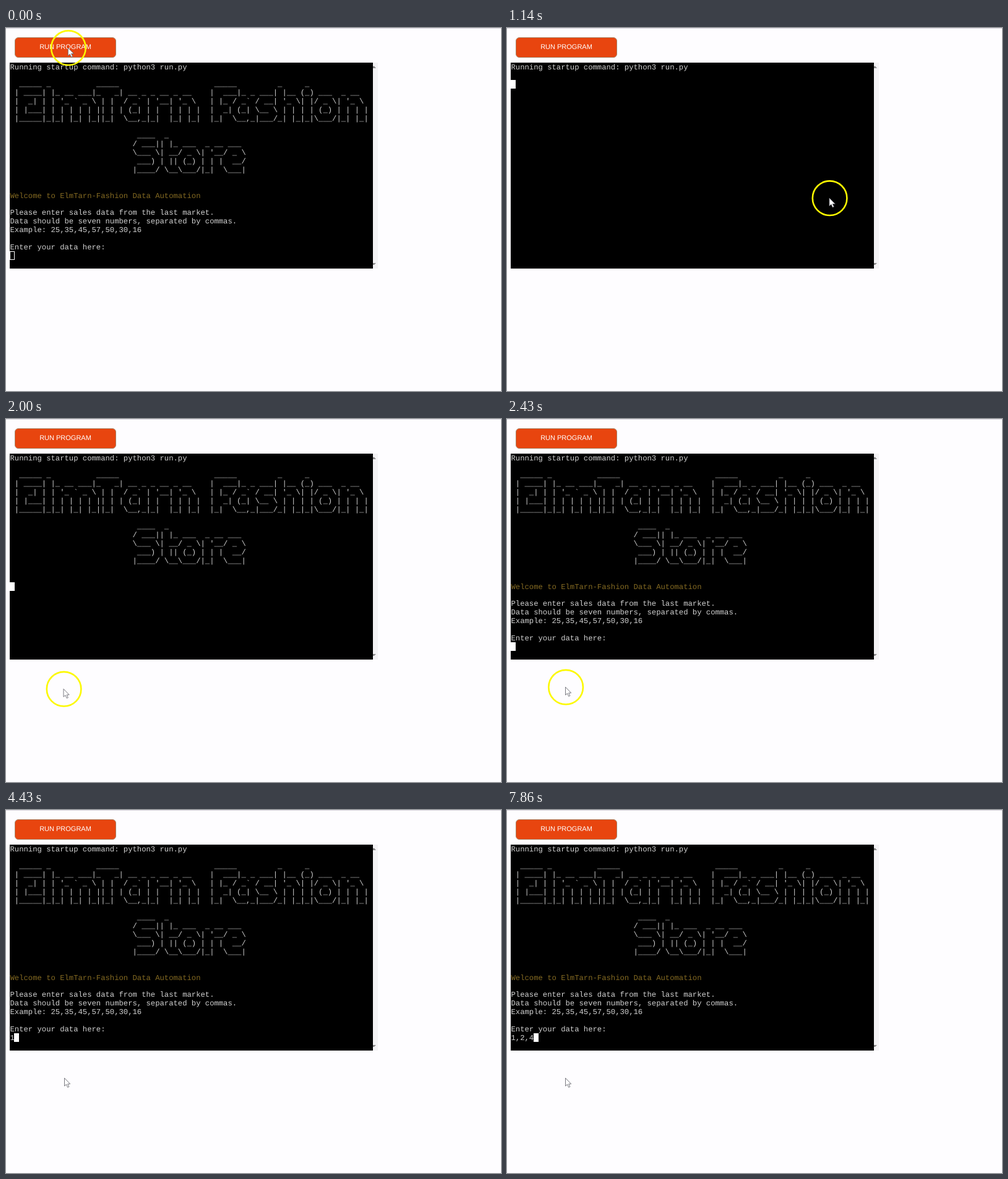
Animation, 800 px wide and 587 px high, one loop 8000 ms. Source, as an HTML page:

```html
<!DOCTYPE html>
<html lang="en">
<head>
<meta charset="utf-8">
<title>Terminal run</title>
<style>
  html, body { margin: 0; width: 100%; height: 100%; overflow: hidden; background: #fefdff; }
  #stage { position: absolute; left: 0; top: 0; width: 800px; height: 587px; overflow: hidden; }
  #stage > *, #term > * { position: absolute; margin: 0; box-sizing: border-box; }
  #topline { left: 0; top: 0; width: 800px; height: 1px; background: #d9d6de; }
  #run {
    left: 14px; top: 15px; width: 164px; height: 33px; border: 1px solid #a98468; border-radius: 6px;
    background: #e8450f; color: #fff; text-align: center;
    font: 11px/31px "Liberation Sans", Arial, sans-serif; text-rendering: geometricPrecision;
  }
  #term {
    left: 6px; top: 56px; width: 587px; height: 333px; background: #000; color: #d0d0d0;
    --row: 13.87px;
    font: 12.22px/var(--row) "Liberation Mono", "Courier New", monospace;
    text-rendering: geometricPrecision;
  }
  #term pre { left: 0.5px; top: calc(var(--r) * var(--row) + 1.5px); font: inherit; white-space: pre; }
  #term #welcome { color: #846a22; }
  #block { width: 8px; height: 14px; border: 1px solid #fff; }
  #scroll { left: 593px; top: 56px; width: 8px; height: 333px; background: #f4f3f5; }
  #overlay { left: 0; top: 0; }
</style>
</head>
<body>
<div id="stage">
  <div id="topline"></div>
  <div id="run">RUN PROGRAM</div>
  <div id="term">
    <pre style="--r:0">Running startup command: python3 run.py</pre>
    <pre id="banner" style="--r:2">
  _____ _          _____                     _____         _     _
 | ____| |_ __ ___|_   _| __ _ _ __ _ __    |  ___|_ _ ___| |__ (_) ___  _ __
 |  _| | | '_ ` _ \ | |  / _` | '__| '_ \   | |_ / _` / __| '_ \| |/ _ \| '_ \
 | |___| | | | | | || | | (_| | |  | | | |  |  _| (_| \__ \ | | | | (_) | | | |
 |_____|_|_| |_| |_||_|  \__,_|_|  |_| |_|  |_|  \__,_|___/_| |_|_|\___/|_| |_|

                            ____  _
                           / ___|| |_ ___  _ __ ___
                           \___ \| __/ _ \| '__/ _ \
                            ___) | || (_) | | |  __/
                           |____/ \__\___/|_|  \___|</pre>
    <pre id="welcome" style="--r:15">Welcome to ElmTarn-Fashion Data Automation</pre>
    <pre id="prompt" style="--r:17">Please enter sales data from the last market.
Data should be seven numbers, separated by commas.
Example: 25,35,45,57,50,30,16

Enter your data here:</pre>
    <pre id="typed" style="--r:22"></pre>
    <div id="block"></div>
  </div>
  <div id="scroll"></div>
  <svg id="overlay" width="800" height="587">
    <path d="M593 62 L595 61.5 L598 65 H593Z M593 380 H598 L595 383 H593Z" fill="#8c8c8c"/>
    <g id="pointer">
      <circle id="ring" cx="0.6" cy="0.2" r="27.8" fill="none" stroke="#fcf900" stroke-width="2.6"/>
      <path d="M0 0 V12.8 L3 10.2 L5.2 15 L7.3 14 L5.2 9.5 H9.2Z" fill="#fff" stroke="#6a6a72" stroke-width="0.9"/>
    </g>
  </svg>
</div>
<script>
const LOOP = 8000, FPS = 7, COL = 7.33, ROW = 13.87;
const $ = id => document.getElementById(id);

// Steps counted in ticks of 1/7 second
const CLEAR = 2, BANNER = 11, PROMPT = 15;
const FADE = [18, 24];
const PATH = [[0, 100.3, 32], [3, 100.3, 32], [7, 521, 275], [9, 521, 275], [14, 93, 436.5], [17, 94.5, 433.5]];
const TYPING = [[29, "1"], [38, "1,"], [41, "1,2"], [43, "1,2,"], [47, "1,2,4"]];

const clamp = v => Math.min(1, Math.max(0, v));
const show = (el, on) => { el.style.visibility = on ? "visible" : "hidden"; };

function pointerAt(tick) {
  const i = PATH.findIndex(p => p[0] > tick);
  if (i < 0) return PATH[PATH.length - 1].slice(1);
  const [t0, x0, y0] = PATH[i - 1], [t1, x1, y1] = PATH[i];
  const u = (tick - t0) / (t1 - t0), e = u * u * (3 - 2 * u);
  return [x0 + (x1 - x0) * e, y0 + (y1 - y0) * e];
}

function draw(ms) {
  const tick = Math.floor((ms + 5) * FPS / 1000);
  const before = tick < CLEAR;
  const banner = before || tick >= BANNER;
  const prompt = before || tick >= PROMPT;
  show($("banner"), banner);
  show($("welcome"), prompt);
  show($("prompt"), prompt);

  const text = TYPING.reduce((s, [t, v]) => tick >= t ? v : s, "");
  $("typed").textContent = text;
  const block = $("block").style;
  block.left = text.length * COL + "px";
  block.top = (prompt ? 22 : banner ? 15 : 2) * ROW + "px";
  block.background = before ? "none" : "#fff";

  $("pointer").setAttribute("transform", `translate(${pointerAt(tick)})`);
  $("ring").setAttribute("opacity", 1 - clamp((tick - FADE[0]) / (FADE[1] - FADE[0])));
}

const start = performance.now();
function loop() {
  draw((performance.now() - start) % LOOP);
  requestAnimationFrame(loop);
}
loop();
</script>
</body>
</html>
```
